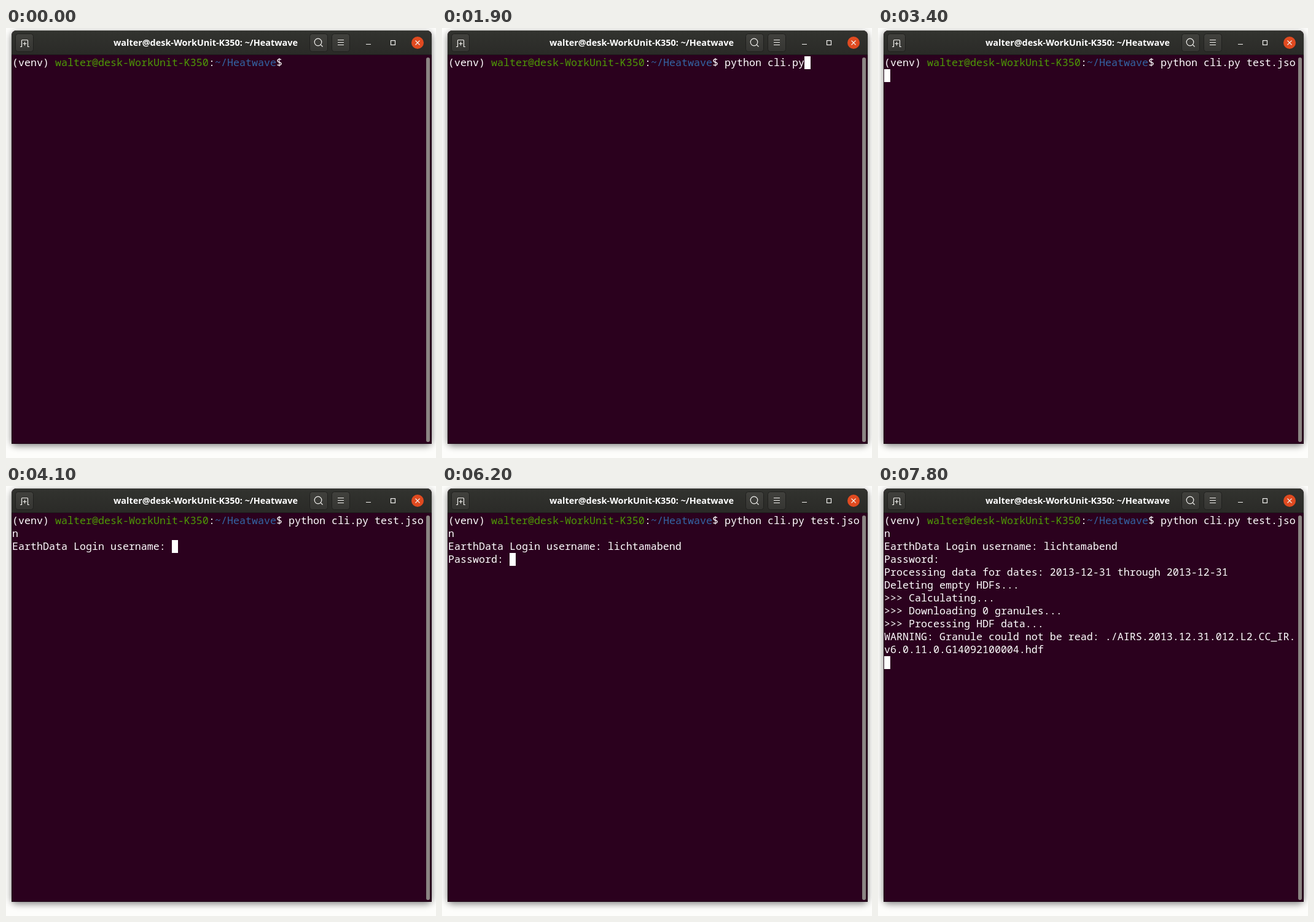
Write an HTML page that moves like this. It is 700x700 px and loops after 8 s.

```html
<!DOCTYPE html>
<html lang="en">
<head>
<meta charset="utf-8">
<title>Terminal</title>
<style>
  html, body { margin: 0; width: 100%; height: 100%; overflow: hidden; background: #fdfdfb; }
  svg { display: block; width: 700px; height: 700px; }
  .term text { font: 16.6667px "Noto Sans Mono", monospace; fill: #fff; white-space: pre; }
  .title { font: bold 14.4px "Noto Sans", "Open Sans", sans-serif; fill: #fff; text-anchor: middle; }
  .icon { fill: none; stroke: #f2f1ee; stroke-width: 1.2; }
  .button rect { fill: url(#face); stroke: #20201e; }
</style>
</head>
<body>
<svg viewBox="0 0 700 700">
  <defs>
    <linearGradient id="bar" x2="0" y2="1">
      <stop offset="0" stop-color="#32332f"/>
      <stop offset="1" stop-color="#2a2a27"/>
    </linearGradient>
    <linearGradient id="face" x2="0" y2="1">
      <stop offset="0" stop-color="#41413d"/>
      <stop offset="1" stop-color="#353532"/>
    </linearGradient>
    <filter id="blur" x="-10%" y="-10%" width="120%" height="120%">
      <feGaussianBlur stdDeviation="6"/>
    </filter>
  </defs>

  <rect width="700" height="700" fill="#fdfdfb"/>
  <rect x="9" y="7" width="684" height="673" rx="8" opacity=".5" filter="url(#blur)"/>
  <path d="M9 677V12a8 8 0 0 1 8-8H685a8 8 0 0 1 8 8V677Z" fill="#2b011e"/>
  <path d="M9 44V12a8 8 0 0 1 8-8H685a8 8 0 0 1 8 8V44Z" fill="url(#bar)"/>
  <path d="M14 4.5H688" stroke="#454541"/>
  <path d="M9 43.5H693" stroke="#1d1a1b"/>
  <path d="M9.5 44V676.5H692.5V44" fill="none" stroke="#1d0415"/>

  <g class="button">
    <rect x="15.5" y="9.5" width="29" height="29" rx="4"/>
    <rect x="494.5" y="9.5" width="29" height="29" rx="4"/>
    <rect x="530.5" y="9.5" width="29" height="29" rx="4"/>
  </g>
  <g class="icon">
    <path d="M23 30.5H25.5V20.5Q25.5 19.5 26.5 19.5H34.5Q35.5 19.5 35.5 20.5V30.5H38M30.5 22.5V28.5M27.5 25.5H33.5"/>
    <circle cx="508" cy="23" r="5.8"/>
    <path d="M512.2 27.2L515.5 30.5M540 19.5H550M540 23.5H550M540 27.5H550M586 26.5H594"/>
    <rect x="626.5" y="20.5" width="7" height="7"/>
  </g>
  <circle cx="670" cy="24" r="10" fill="#e04a20"/>
  <path class="icon" d="M666.5 20.5L673.5 27.5M673.5 20.5L666.5 27.5"/>
  <text class="title" id="title" x="325" y="29"></text>

  <g class="term" id="rows"></g>
  <rect id="cursor" width="10" height="21" fill="#fff"/>
  <rect x="684" y="48" width="6" height="626" rx="3" fill="#8b8583"/>
</svg>
<script>
const LOOP = 8000, COLS = 67, ROWS = 12, CELL = 10, LINE = 21, LEFT = 10, TOP = 46;
const host = "walter@desk-WorkUnit-K350", dir = "~/Heatwave";
const prompt = [["(venv) ", "#fff"], [host, "#4e9a06"], [":", "#fff"], [dir, "#3465a4"], ["$ ", "#fff"]];

// Output stream: [time, text]; \b erases one character.
const events = [];
const emit = (time, text) => events.push([time, text]);
const type = (start, ...keys) => keys.forEach((key, i) => emit(start + i * 100, key));

type(400, ..."python");
emit(1100, " c");
type(1300, "l", "i");
emit(1600, ".");
type(1800, "p", "y", " ");
type(2200, "t", "e", "s", "t.");
emit(2700, "sj");
emit(2900, "\b");
type(3100, "\b", "j", "s", "o", "n", "\n");
emit(4100, "EarthData Login username: ");
emit(4900, "l");
type(5100, "i", "c", "ht");
type(5500, "a", "ma");
type(5800, "b", "e", "nd");
emit(6200, "\nPassword: ");
emit(7400, "\nProcessing data for dates: 2013-12-31 through 2013-12-31\n" +
  "Deleting empty HDFs...\n>>> Calculating...\n");
emit(7700, ">>> Downloading 0 granules...\n>>> Processing HDF data...\n");
emit(7800, "WARNING: Granule could not be read: " +
  "./AIRS.2013.12.31.012.L2.CC_IR.v6.0.11.0.G14092100004.hdf\n");

const hidden = [[0, 200], [4200, 4800], [6700, 7100]];

const byId = id => document.getElementById(id);
function add(parent, tag, attrs) {
  const node = document.createElementNS("http://www.w3.org/2000/svg", tag);
  for (const key in attrs) node.setAttribute(key, attrs[key]);
  return parent.appendChild(node);
}

byId("title").textContent = `${host}: ${dir}`;
const baseline = row => TOP + row * LINE + 16;
let column = 0;
for (const [text, fill] of prompt) {
  const part = add(byId("rows"), "text", { x: LEFT + column * CELL, y: baseline(0), style: `fill:${fill}` });
  part.textContent = text;
  column += text.length;
}
const rows = Array.from({ length: ROWS }, (_, row) =>
  add(byId("rows"), "text", { x: LEFT + (row ? 0 : column * CELL), y: baseline(row) }));
const cursor = byId("cursor");

function screenAt(time) {
  let stream = "";
  for (const [start, text] of events) {
    if (start > time) break;
    stream = text === "\b" ? stream.slice(0, -1) : stream + text;
  }
  const lines = [""];
  let col = column;
  for (const char of stream) {
    if (char !== "\n") {
      lines[lines.length - 1] += char;
      col++;
    }
    if (char === "\n" || col === COLS) {
      lines.push("");
      col = 0;
    }
  }
  return { lines, col };
}

function draw(time) {
  const { lines, col } = screenAt(time);
  rows.forEach((row, i) => {
    const text = lines[i] || "";
    if (row.textContent !== text) row.textContent = text;
  });
  cursor.setAttribute("x", LEFT + col * CELL);
  cursor.setAttribute("y", TOP + (lines.length - 1) * LINE);
  const off = hidden.some(([from, to]) => time >= from && time < to);
  cursor.setAttribute("visibility", off ? "hidden" : "visible");
}

const begin = performance.now();
function tick() {
  draw((performance.now() - begin) % LOOP);
  requestAnimationFrame(tick);
}
draw(0);
requestAnimationFrame(tick);
</script>
</body>
</html>
```
